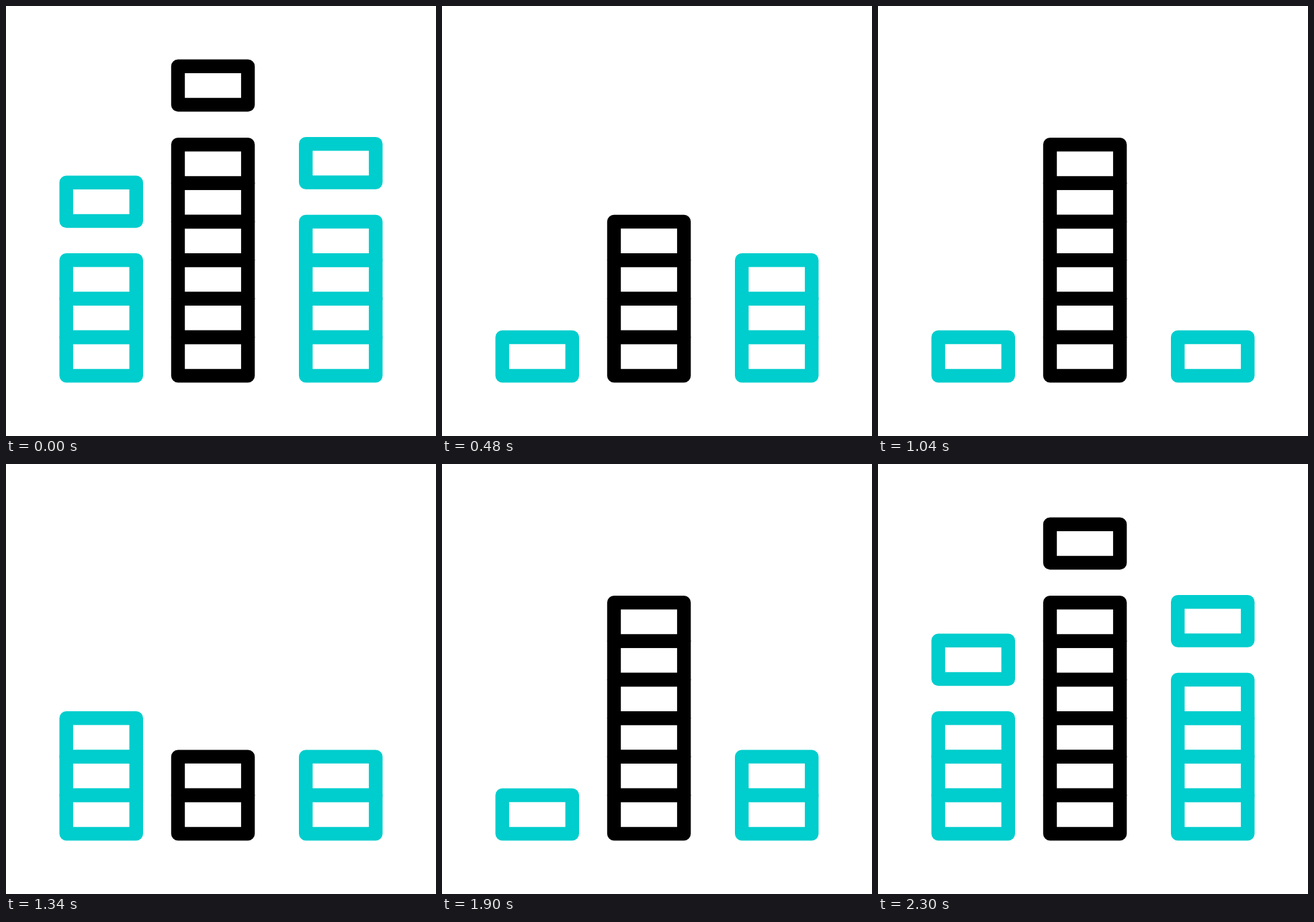
Write an HTML page that moves like this. It is 640 px wide and 640 px high and loops after 2400 ms.

```html
<!DOCTYPE html>
<html lang="en">
<head>
<meta charset="utf-8">
<title>Equalizer</title>
<style>
  html, body { margin: 0; width: 100%; height: 100%; overflow: hidden; background: #fff; }
  svg { display: block; width: 100vw; height: 100vh; }
  rect { fill: none; stroke-width: 20.4; stroke-linejoin: round; }
</style>
</head>
<body>
<svg viewBox="0 0 640 640"></svg>
<script>
const LOOP = 2400;
const TEAL = '#00cdcd';
const BLOCK = { width: 104.1, height: 57.34 };
const BASE_Y = 493;
const svg = document.querySelector('svg');

// Lag shifts a bar's steps within a phase, so the bars do not move in unison.
const bars = [
  { x: 89.7, color: TEAL, stacked: 3, capY: 262.7, lag: 1 },
  { x: 256, color: '#000', stacked: 6, capY: 89.7, lag: 0 },
  { x: 446.2, color: TEAL, stacked: 4, capY: 205.2, lag: 0.5 }
];

// Levels count the lit blocks of each bar once the phase is over.
const phases = [
  { start: 100, end: 480, levels: [1, 4, 3] },
  { start: 520, end: 680, levels: [1, 2, 3] },
  { start: 680, end: 780, levels: [4, 6, 3] },
  { start: 860, end: 1040, levels: [1, 6, 1] },
  { start: 1180, end: 1340, levels: [3, 2, 2] },
  { start: 1480, end: 1480, levels: [3, 2, 3] },
  { start: 1680, end: 1900, levels: [1, 6, 2] },
  { start: 2040, end: 2300, levels: [4, 7, 5] }
];

// Walks one block at a time, evenly spaced, through every phase.
function levelSteps({ stacked, lag }, barIndex) {
  let level = stacked + 1;
  const steps = [{ time: 0, level }];
  for (const { start, end, levels } of phases) {
    const change = levels[barIndex] - level;
    const count = Math.abs(change);
    for (let i = 0; i < count; i++) {
      level += Math.sign(change);
      steps.push({ time: start + (end - start) * (i + lag) / count, level });
    }
  }
  return steps;
}

function addBlock(bar, index) {
  const rect = document.createElementNS('http://www.w3.org/2000/svg', 'rect');
  const y = index < bar.stacked ? BASE_Y - index * BLOCK.height : bar.capY;
  const attributes = { x: bar.x, y, ...BLOCK, stroke: bar.color };
  for (const [name, value] of Object.entries(attributes)) rect.setAttribute(name, value);
  svg.append(rect);
  return rect;
}

function blink(rect, index, steps) {
  const frames = steps.map(({ time, level }) => ({
    offset: time / LOOP,
    opacity: level > index ? 1 : 0,
    easing: 'steps(1, end)'
  }));
  frames.push({ offset: 1, opacity: frames.at(-1).opacity });
  const animation = rect.animate(frames, { duration: LOOP, iterations: Infinity });
  animation.startTime = document.timeline.currentTime;
}

bars.forEach((bar, barIndex) => {
  const steps = levelSteps(bar, barIndex);
  for (let i = 0; i <= bar.stacked; i++) blink(addBlock(bar, i), i, steps);
});
</script>
</body>
</html>
```
